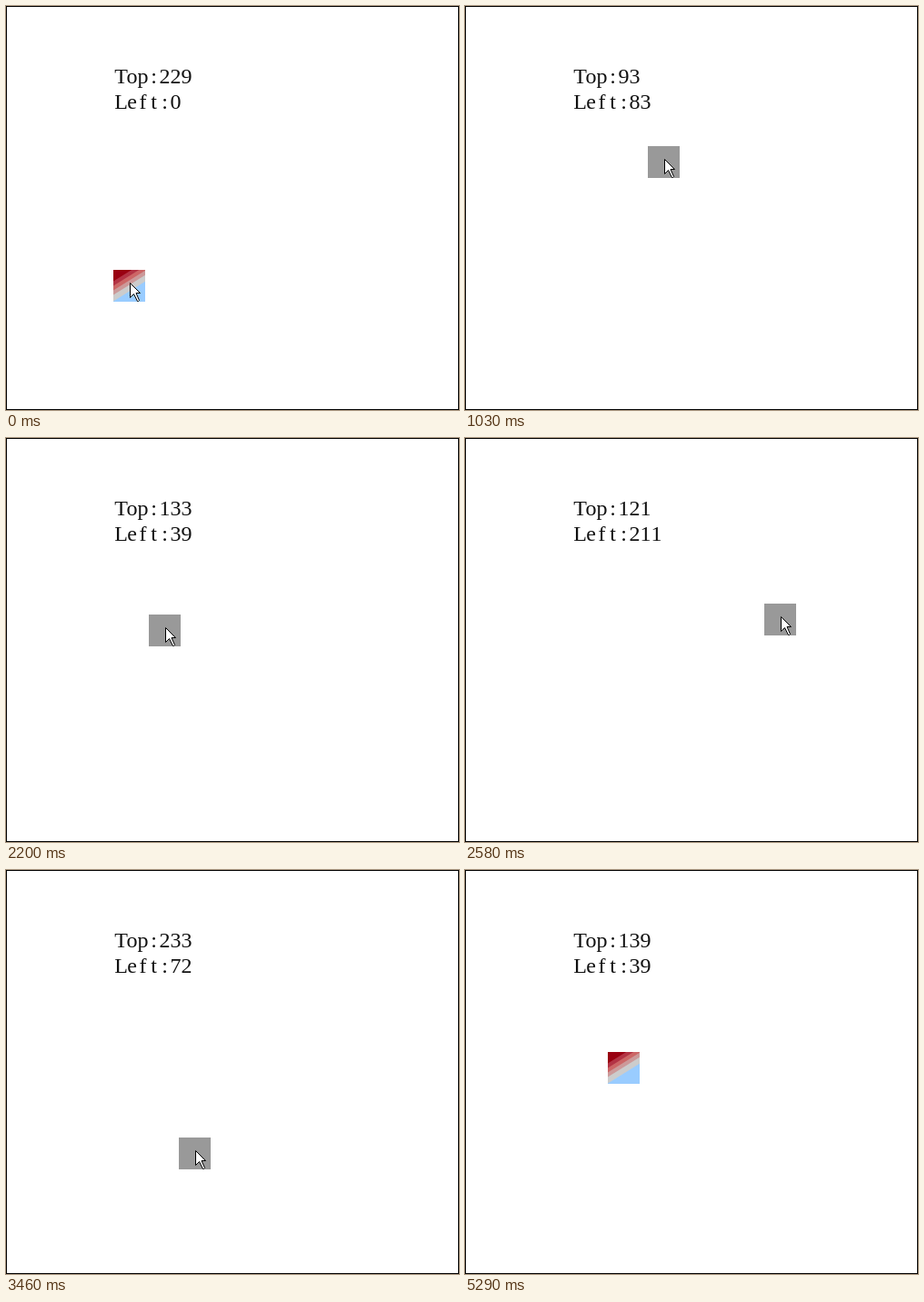
These frames come from a looping animation (498 by 444 pixels, 5320 ms). An HTML page:

```html
<!DOCTYPE html>
<html lang="en">
<head>
<meta charset="utf-8">
<title>Drag position</title>
<style>
  html, body { margin: 0; width: 100%; height: 100%; overflow: hidden; background: #fff; }
  svg { display: block; width: 498px; height: 444px; }
  text { font: 24px "Liberation Serif", "Noto Serif", serif; text-anchor: middle; fill: #111; }
</style>
</head>
<body>
<svg viewBox="0 0 498 444">
  <defs><clipPath id="tile"><rect width="35" height="35"/></clipPath></defs>
  <text id="top" y="85"></text>
  <text id="left" y="113"></text>
  <g id="box">
    <g id="stripes" clip-path="url(#tile)"></g>
    <rect id="held" width="35" height="35" fill="#999"/>
  </g>
  <path id="cursor" d="M.5 .5V16.5L4.5 12.5L8.5 20.5H9.5L10.5 19.5L7 11.5H11.5Z" fill="#fff" stroke="#000"/>
  <rect x=".5" y=".5" width="497" height="443" fill="none" stroke="#000"/>
</svg>
<script>
const LOOP = 5320, STEP = 30, GRAB = 100, DROP = 4430, EXIT = 4660, GONE = 5290;
const CELL = 12;
const $ = id => document.getElementById(id);

// turning points of the drag
const turns = [
  { t: 460, x: 118, y: 290 }, { t: 1030, x: 201, y: 154 }, { t: 1250, x: 238, y: 112 },
  { t: 1540, x: 296, y: 160 }, { t: 2080, x: 183, y: 204 }, { t: 2200, x: 157, y: 194 },
  { t: 2620, x: 363, y: 182 }, { t: 2800, x: 462, y: 205 }, { t: 2950, x: 383, y: 240 },
  { t: 3190, x: 363, y: 347 }, { t: 3460, x: 190, y: 294 }, { t: 3760, x: 164, y: 248 },
  { t: 4090, x: 283, y: 220 }, { t: 4330, x: 153, y: 204 }, { t: 4390, x: 157, y: 200 }
];

// speed at a turning point: zero where the direction reverses
function speed(i, axis) {
  const p = turns[i - 1], c = turns[i], n = turns[i + 1];
  if (!p || !n || (c[axis] - p[axis]) * (n[axis] - c[axis]) <= 0) return 0;
  return (n[axis] - p[axis]) / (n.t - p.t);
}

function boxAt(t) {
  const next = turns.findIndex(p => p.t > t);
  if (next === 0) return turns[0];
  if (next < 0) return turns[turns.length - 1];
  const a = turns[next - 1], b = turns[next], span = b.t - a.t;
  const u = (t - a.t) / span, v = 1 - u;
  const at = axis => Math.round(
    a[axis] * v * v * (1 + 2 * u) + b[axis] * u * u * (1 + 2 * v) +
    span * u * v * (speed(next - 1, axis) * v - speed(next, axis) * u));
  return { x: at('x'), y: at('y') };
}

// the pointer grips the box, then runs off to the corner after the drop
function tipAt(t, box) {
  const u = Math.min(1, Math.max(0, (t - DROP) / (EXIT - DROP)));
  const mix = (a, b) => Math.round(a + (b - a) * u);
  return { x: mix(box.x + 18, 490), y: mix(box.y + 14, 437) };
}

const snap = t => Math.floor((t - 10) / STEP) * STEP + 10;
const move = (el, p) => el.setAttribute('transform', `translate(${p.x} ${p.y})`);
const show = (el, on) => { el.style.display = on ? '' : 'none'; };

// monospaced line: each character is centred in its own cell
function write(id, value) {
  const el = $(id);
  if (el.textContent === value) return;
  el.setAttribute('x', [...value].map((_, i) => 126.5 + CELL * i).join(' '));
  el.textContent = value;
}

// diagonal bands, painted from the far corner inwards
const bands = ['#990011', '#b33344', '#cc6666', '#cc9999', '#cccccc', '#99ccff'];
$('stripes').innerHTML = bands.map((color, i) => {
  const y = 12.5 + i * 5 + (i > 3 ? 2 : 0) + (i > 4 ? 40 : 0);
  return `<path fill="${color}" d="M0 -50V${y}L50 ${y - 31}V-50Z"/>`;
}).reverse().join('');

function draw(t) {
  const step = snap(t), box = boxAt(step);
  move($('box'), box);
  move($('cursor'), tipAt(step, box));
  show($('held'), t >= GRAB && t < DROP);
  show($('cursor'), t < GONE && !(t >= 2800 && t < 3000));
  write('top', 'Top:' + (box.y - 61));
  write('left', 'Left:' + (box.x - 118));
}

const start = performance.now();
function tick(now) {
  draw(Math.max(0, now - start) % LOOP);
  requestAnimationFrame(tick);
}
draw(0);
requestAnimationFrame(tick);
</script>
</body>
</html>
```
